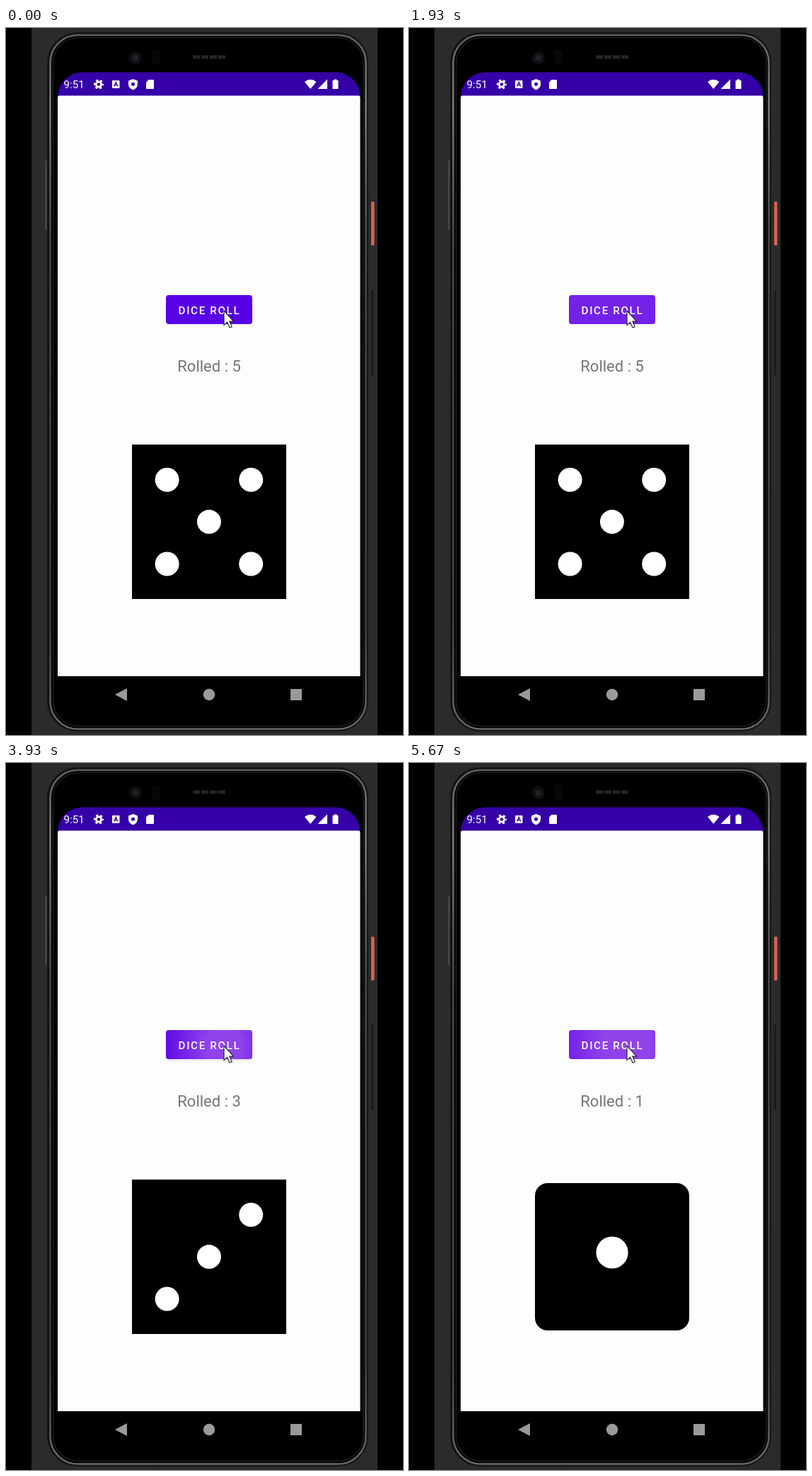
Recreate the animation shown at these times as an HTML page. Size 561 by 998 pixels, loop 5.71 s.

```html
<!DOCTYPE html>
<html lang="en">
<head>
<meta charset="utf-8">
<title>Dice roll</title>
<style>
html, body { margin: 0; width: 100%; height: 100%; overflow: hidden; background: #000; }
svg { display: block; width: 561px; height: 998px; }
text { font-family: Roboto, "Liberation Sans", sans-serif; }
</style>
</head>
<body>
<svg viewBox="0 0 561 998">
  <defs>
    <radialGradient id="glow" gradientUnits="userSpaceOnUse" cx="308" cy="398" r="1">
      <stop offset=".25" stop-color="#ffc4f4"/><stop offset="1" stop-color="#ffc4f4" stop-opacity="0"/>
    </radialGradient>
    <linearGradient id="rim" x1="0" y1="0" x2="0" y2="1">
      <stop offset="0" stop-color="#606060"/><stop offset=".1" stop-color="#7c7c7c"/>
      <stop offset=".3" stop-color="#484848"/><stop offset=".85" stop-color="#404040"/>
      <stop offset="1" stop-color="#686868"/>
    </linearGradient>
    <filter id="blur" x="-20%" y="-40%" width="140%" height="180%"><feGaussianBlur stdDeviation="2.5"/></filter>
    <filter id="soft"><feGaussianBlur stdDeviation=".7"/></filter>
  </defs>

  <!-- phone -->
  <rect x="36" width="489" height="998" fill="#2b2b2b"/>
  <g filter="url(#soft)">
    <rect x="59" y="7" width="452" height="985" rx="42" fill="#0c0c0c" stroke="#161616" stroke-width="2"/>
    <rect x="62.500" y="10" width="446" height="979.500" rx="39" fill="#000" stroke="url(#rim)" stroke-width="2.600"/>
    <rect x="66.500" y="13.500" width="438.500" height="972" rx="36" fill="#000" stroke="#1e1e1e" stroke-width="1.500"/>
    <path d="M56.500 187V285" stroke="#555" stroke-width="1.500"/>
    <path d="M517.500 369V490" stroke="#1b1b1b" stroke-width="3"/>
    <rect x="516" y="245" width="4.500" height="62" rx="1.500" fill="#d9604f"/>
    <circle cx="183" cy="42" r="9" fill="#101013"/>
    <circle cx="183" cy="42" r="4" fill="#22222a"/>
    <rect x="206" y="31" width="11" height="21" rx="3" fill="#070707"/>
    <path d="M264 41H311" stroke="#252525" stroke-width="5" stroke-dasharray="10 2"/>
  </g>

  <!-- status bar -->
  <path d="M73 97A35 35 0 0 1 108 62.500H466A35 35 0 0 1 500.500 97Z" fill="#3500a8"/>
  <g fill="#fff">
    <text x="81.500" y="85" font-size="15.200">9:51</text>
    <circle cx="131" cy="79.500" r="3.700" fill="none" stroke="#fff" stroke-width="2.800"/>
    <circle cx="131" cy="79.500" r="5.900" fill="none" stroke="#fff" stroke-width="2.400" stroke-dasharray="3.100 3.080" stroke-dashoffset="1.550"/>
    <rect x="150" y="74" width="10.500" height="11" rx="1"/>
    <path d="M152.700 82.500L155.250 76.200L157.800 82.500M153.700 80.500H156.800" fill="none" stroke="#3500a8" stroke-width="1.300"/>
    <path d="M179.500 72L186 74.500V79Q186 85 179.500 87.500Q173 85 173 79V74.500Z"/>
    <circle cx="179.500" cy="79.300" r="2.500" fill="#3500a8"/>
    <path d="M201.500 73H208Q209 73 209 74V85Q209 86 208 86H199Q198 86 198 85V76.500Z"/>
    <path d="M422 76Q430 69.500 438.500 76L430.200 86Z"/>
    <path d="M454 72.500V86H440.500Z"/>
    <path d="M463.500 72.500H467.500V74H469.500V86H461.500V74H463.500Z"/>
  </g>

  <!-- app -->
  <path d="M73 915V98Q73 95.500 76 95.500H498Q500.500 95.500 500.500 98V915Z" fill="#fdfdfe"/>
  <rect id="shadow" x="226" y="379" width="122" height="41" rx="4" fill="#221" filter="url(#blur)"/>
  <rect x="226" y="377" width="122" height="41" rx="4" fill="#5800e6"/>
  <rect id="ripple" x="226" y="377" width="122" height="41" rx="4" fill="url(#glow)"/>
  <text x="243.600" y="403.600" font-size="15.200" font-weight="500" letter-spacing="1.650" fill="#fff">DICE ROLL</text>
  <text id="label" x="242.300" y="485" font-size="22" fill="#757575"></text>
  <rect id="die" x="178" width="218"/>
  <g id="pips" fill="#fff"></g>
  <path d="M308 399V419.500L312.600 415.300L316 423L319.200 421.600L315.900 414.200H321.500Z" fill="#fff" stroke="#2a2438" stroke-width="1.200"/>

  <!-- navigation bar -->
  <g fill="#9a9a9a">
    <path d="M154 941L171 932V950Z"/>
    <circle cx="287" cy="941" r="8.200"/>
    <rect x="402" y="933" width="16" height="16"/>
  </g>
</svg>
<script>
const LOOP = 5710, RELEASE = 60, GROW = 450, FADE = 375;
// [press time, rolled value]
const rolls = [[-2000, 5], [300, 1], [860, 6], [1290, 5], [1940, 1], [2390, 3],
  [2980, 2], [3360, 4], [3790, 3], [4510, 4], [4990, 6], [5460, 1]];
// pip cells, numbered row by row in a 3 by 3 grid
const faces = { 2: [2, 6], 3: [2, 4, 6], 4: [0, 2, 6, 8], 5: [0, 2, 4, 6, 8], 6: [0, 2, 3, 5, 6, 8] };
const $ = id => document.getElementById(id);
const set = (id, attrs) => { for (const k in attrs) $(id).setAttribute(k, attrs[k]); };
const clamp = v => Math.max(0, Math.min(1, v));
const dot = (x, y, r) => `<circle cx="${x}" cy="${y}" r="${r}"/>`;
let shown;

function showFace(n) {
  if (n === shown) return;
  shown = n;
  $('label').textContent = 'Rolled : ' + n;
  const one = n === 1;
  set('die', { y: one ? 593 : 588, height: one ? 208 : 218, rx: one ? 18 : 0 });
  $('pips').innerHTML = one ? dot(287, 691, 22.6)
    : faces[n].map(c => dot(227.6 + c % 3 * 59.3, 637.7 + Math.floor(c / 3) * 59.4, 17)).join('');
}

function showPress(age) {
  const alpha = clamp(age / 90) * clamp((GROW + FADE - age) / FADE);
  set('glow', { r: 40 + age * .35 + (age / 100) ** 4 });
  set('ripple', { opacity: .34 * alpha });
  set('shadow', { opacity: .16 * clamp(age / 50) * clamp((200 - age) / 80) });
}

function draw() {
  const t = performance.now() % LOOP;
  const last = delay => rolls.findLast(([start]) => start + delay <= t);
  showFace(last(RELEASE)[1]);
  showPress(t - last(0)[0]);
  requestAnimationFrame(draw);
}
draw();
</script>
</body>
</html>
```
